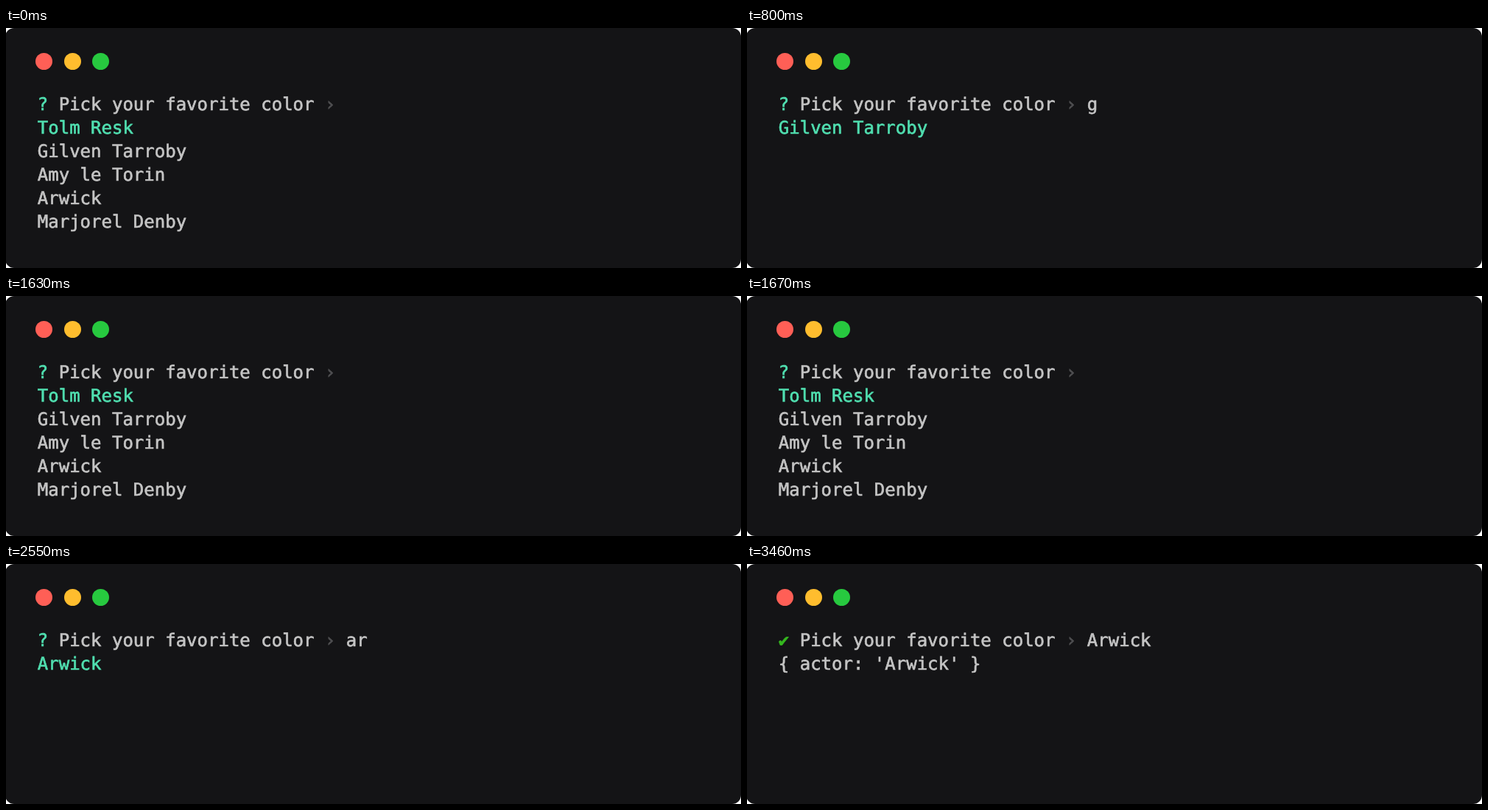
Write an HTML page that moves like this. It is 998 px wide and 327 px high and loops after 3.59 s.

```html
<!DOCTYPE html>
<html lang="en">
<head>
<meta charset="utf-8">
<title>Autocomplete prompt</title>
<style>
  html, body { margin: 0; width: 100%; height: 100%; overflow: hidden; background: #fff; }
  .terminal { position: absolute; inset: 0 0 0 -1px; border-radius: 12px; background: #141416; }
  .dot { position: absolute; top: 34px; width: 23px; height: 23px; border-radius: 50%; }
  pre {
    position: absolute; left: 42.8px; top: 87.5px; margin: 0;
    font: 24px/32px "DejaVu Sans Mono", monospace;
    text-rendering: geometricPrecision;
    color: #c5c5c5; -webkit-text-stroke: 0.65px;
  }
  .active, .mark { color: #50dfb0; }
  .done { color: #35b81f; }
  .dim { color: #505052; }
</style>
</head>
<body>
<div class="terminal"></div>
<div class="dot" style="left: 40px; background: #ff5f56"></div>
<div class="dot" style="left: 78.7px; background: #ffbd2e"></div>
<div class="dot" style="left: 117.4px; background: #27c93f"></div>
<pre id="screen"></pre>
<script>
const LOOP = 3590;
const choices = ['Tolm Resk', 'Gilven Tarroby', 'Amy le Torin', 'Arwick', 'Marjorel Denby'];
// Typed input from each moment (ms) on
const typed = [[0, ''], [650, 'g'], [1010, ''], [1810, 'a'], [2250, 'ar']];
const SUBMIT = 2630;

const screen = document.getElementById('screen');
const span = (style, text) => `<span class="${style}">${text}</span>`;
const prompt = (mark, input) => `${mark} Pick your favorite color ${span('dim', '›')} ${input}\n`;

function view(t) {
  const input = typed.findLast(([start]) => t >= start)[1];
  const matches = choices.filter(name => name.toLowerCase().startsWith(input));
  if (t >= SUBMIT) return prompt(span('done', '✔'), matches[0]) + `{ actor: '${matches[0]}' }`;
  const [first, ...rest] = matches;
  return prompt(span('mark', '?'), input) + [span('active', first), ...rest].join('\n');
}

let shown = '';
function draw() {
  const next = view(performance.now() % LOOP);
  if (next !== shown) screen.innerHTML = shown = next;
  requestAnimationFrame(draw);
}
draw();
</script>
</body>
</html>
```
